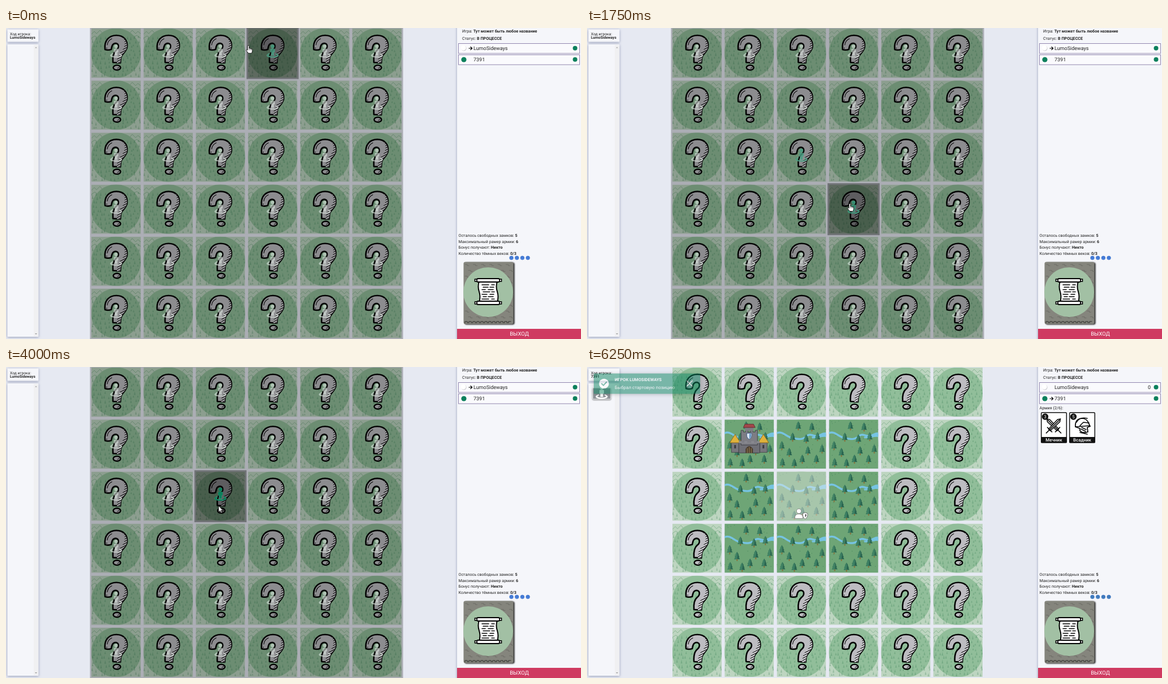
Animation, 1016 px wide and 551 px high, one loop 6500 ms. Source, as an HTML page:

```html
<!DOCTYPE html>
<html lang="ru">
<head>
<meta charset="utf-8">
<style>
html, body { margin: 0; width: 100%; height: 100%; overflow: hidden; background: #e6e9f2; }
svg { display: block; width: 1016px; height: 551px; font-family: Roboto, sans-serif; fill: #222; text-rendering: geometricPrecision; }
.panel { fill: #f5f6fa; filter: drop-shadow(0 1px 2px #5a648c99); }
.line { fill: none; stroke: #000; stroke-linecap: round; stroke-linejoin: round; }
b, .b { font-weight: 700; }
</style>
</head>
<body>
<svg id="stage" viewBox="0 0 1016 551"></svg>
<script>
const LOOP = 6500, REVEAL = 4250, SETTLED = 4500, TOAST_FADE = 6250;
const PITCH = 92.2, SIZE = 87;
const PLAYER = 'LumoSideways', RIVAL = '7391';
const GREEN = '#0c805c';

// time, hovered column, row, pawn tint
const hovers = [
  [0, 3, 0, .6], [250, 2, 0, .6], [500, 2, 0, 1], [750, 1, 1, .6], [1000, 1, 1, 1],
  [1250, 2, 2, .6], [1500, 2, 2, 1], [1750, 3, 3, .7], [2000, 4, 3, .6], [2250, 4, 3, 1],
  [2500, 3, 2, .15], [2750, 2, 2, .6], [3000, 2, 2, 1]
];
// time, x, y, shape
const pointer = [
  [0, 424, 31, 'hand'], [250, 392, 79, 'hand'], [500, 330, 91, 'hand'], [750, 300, 143, 'hand'],
  [1000, 322.5, 174, 'hand'], [1250, 366, 235, 'hand'], [1500, 405, 275, 'hand'],
  [1750, 460, 311, 'hand'], [2000, 545, 325, 'hand'], [2250, 566, 336, 'hand'],
  [2500, 446.5, 263, 'hand'], [2750, 388, 256, 'hand'], [3000, 375, 248, 'hand'],
  [3250, 374, 247, 'hand'], [4000, 375.5, 246, 'arrow'], [5000, 430, 140, 'arrow'],
  [5250, 469.5, 53, 'arrow'], [5500, 499, 5.5, 'arrow'], [5750, 0, 0, '']
];

let seed = 7;
const rnd = () => (seed = seed * 16807 % 2147483647) / 2147483647;
const range = (n, f) => Array.from({ length: n }, (_, i) => f(i)).join('');
const rect = (x, y, w, h, fill, more = '') => `<rect x="${x}" y="${y}" width="${w}" height="${h}" fill="${fill}" ${more}/>`;
const disc = (x, y, r, fill, more = '') => `<circle cx="${x}" cy="${y}" r="${r}" fill="${fill}" ${more}/>`;
const path = (d, fill, more = '') => `<path d="${d}" fill="${fill}" ${more}/>`;
const line = (d, w = 1, color = '#000') => `<path class="line" d="${d}" style="stroke:${color};stroke-width:${w}"/>`;
const text = (x, y, size, s, more = '') => `<text x="${x}" y="${y}" font-size="${size}" ${more}>${s}</text>`;
const bold = s => `<tspan class="b">${s}</tspan>`;
const use = (id, x, y, more = '') => `<use href="#${id}" transform="translate(${x} ${y})" ${more}/>`;
const group = (id, s, more = '') => `<g id="${id}" ${more}>${s}</g>`;
const cellX = c => 151 + PITCH * c, cellY = r => 1 + PITCH * r;

const paleTrees = range(120, i => {
  const x = (i % 12) * 7.4 + rnd() * 5, y = 14 + (i / 12 | 0) * 7.4 + rnd() * 4;
  const h = 2 + rnd() * 2.2;
  return path(`M${x} ${y - h}l1.5 ${h * 1.7}h-3z`, '#3d8058', 'opacity=".3"');
});
const hills = line('M0 10l5-5 4 4 6-6 5 6 5-3 5 5M56 9l6-4 5 4 5-6 6 6 4-4 6 5M0 17l6-4 5 4M74 16l6-4 7 5', .8, '#7fae8c');
const mark = 'M24 37C22 20 32 12 44 12C57 12 64 21 63 32C62 42 53 45 52 52L51 61L38 60C37 48 39 42 44 38C49 34 49 27 43 26C37 26 36 31 35 37Q29 39 24 37Z';
const side = 'M56 16C66 26 64 37 57 43C53 47 52 52 51 61L45 61C45 50 47 46 53 40C60 33 60 24 56 16Z';
const question =
  path(mark, '#bdbcc1', 'stroke="#000" stroke-width="2.6" stroke-linejoin="round"') +
  path(side, '#d2d1d6') +
  `<g clip-path="url(#sideClip)">${range(12, i => line(`M42 ${24 + i * 4}L67 ${11 + i * 4}`, 1.1))}</g>` +
  line('M28 29Q29 21 36 18M27 34v1', 1.1) +
  `<ellipse cx="45" cy="69.2" rx="6.5" ry="4.3" fill="#bdbcc1" stroke="#000" stroke-width="2.4"/>` +
  line('M46 70.5l3-2', 1);

const tree = path('M0 -8L3 -3H2L4.3 1H3L5 5H-5L-3 1H-4.3L-2 -3H-3Z', '#28634f') +
  path('M0 -8L1 -3 0 5H-5L-3 1H-4.3L-2 -3H-3Z', '#3d8063') + rect(-.9, 5, 1.8, 3, '#8a6a32');
const treeSpots = [[38, 11], [62, 13], [72, 30], [28, 31], [52, 34], [9, 46], [55, 55], [22, 58], [80, 52], [70, 70], [45, 70], [10, 76], [31, 77]];
const land = rect(0, 0, SIZE, SIZE, '#6ea576') +
  range(40, () => disc(rnd() * 87, rnd() * 87, .7, '#4f8c60')) +
  line('M0 24C10 19 17 31 28 33S45 36 53 29S67 35 87 27', 3.4, '#76c3e2') +
  path('M62 30C72 31 78 22 87 23V31C78 29 72 34 62 33Z', '#76c3e2') +
  treeSpots.map(([x, y], i) => use('tree', x, y, i % 3 == 2 ? 'opacity=".9"' : '')).join('');

const tower = x => rect(x, 40, 13, 18, '#77777d', 'stroke="#3c3c42" stroke-width=".8"') +
  path(`M${x - 3} 41L${x + 6.5} 26L${x + 16} 41Z`, '#e0b23b', 'stroke="#7b5b18" stroke-width=".8"') +
  rect(x + 5, 45, 3, 6, '#38383d');
const castle = tower(12) + tower(62) +
  rect(25, 42, 37, 17, '#6f6f76', 'stroke="#3c3c42" stroke-width=".8"') +
  path('M29 45V19H33V22H37V19H41V22H46V19H50V22H54V19H58V45Z', '#7d7d84', 'stroke="#3c3c42" stroke-width=".9"') +
  rect(36, 13, 15, 7, '#7d7d84') + path('M33 14L36 8H51L54 14Z', '#a2474a', 'stroke="#5c2529" stroke-width=".8"') +
  path('M25 42v-4h5v3h5v-3h5v3h7v-3h5v3h5v-3h5v4z', '#88888f') +
  path('M37 59V52Q43.5 42 50 52V59Z', '#4a3c2e') + line('M40 59v-8M43.5 59v-10M47 59v-8', 1, '#a58b5c') +
  path('M39 24h9v5q-1 5-4.500 6q-3.500-1-4.500-6z', '#dce7f2', 'stroke="#3d587c"') + path('M43.500 25h3.500v4q-1 4-3.500 5z', '#6a9ac9');

const pawn = disc(43.5, 31.5, 3.2, 'inherit') +
  path('M39.5 36Q43.500 34.500 47.500 36V42H46V48H41V42H39.500Z', 'inherit') +
  path('M38.500 43.500C29 46 32 51.500 43.500 51.500S58 46 48.500 43.500V45.500C54 47 50 49 43.500 49S33 47 38.500 45.500Z', 'inherit');

const hand = path('M3 1.500Q3 0 4.300 0T5.600 1.500V5Q7 4.300 7.600 5.400Q9 4.800 9.500 6Q11 5.500 11.200 7V10Q11 12 9.700 13.800H4.500L.5 9Q0 7.400 1.600 7.300L3 8.500Z', '#fff', 'stroke="#111" stroke-width=".9"') +
  line('M5.600 5v3M7.600 5.500v2.500M9.500 6v2', .5);
const arrow = path('M0 0V11L2.600 8.600L4.500 12.600L6.300 11.800L4.500 7.900H8Z', '#fff', 'stroke="#111" stroke-width=".9"');

const defs = `<defs><clipPath id="sideClip"><path d="${side}"/></clipPath>
  <clipPath id="tileClip"><rect width="87" height="87"/></clipPath>` +
  group('tree', tree) + group('pawn', pawn) + group('land', land, 'clip-path="url(#tileClip)"') +
  group('fog', rect(0, 0, SIZE, SIZE, '#bdd5c0') + hills + disc(43.5, 43.5, 44, '#91be9a') + paleTrees + question, 'clip-path="url(#tileClip)"') + '</defs>';

const cells = f => range(36, i => f(i % 6, i / 6 | 0));
const isLand = (c, r) => c > 0 && c < 4 && r > 0 && r < 4;
const fog = cells((c, r) => use('fog', cellX(c), cellY(r)));
const unit = disc(39, 70, 4.200, '#fff', 'stroke="#777" stroke-width=".8"') +
  path('M32 83V80Q33 75 39 75Q45 75 46 80V83Z', '#fff', 'stroke="#777" stroke-width=".8"') +
  path('M46 74L50 72.500L54.500 74Q55 81 50 84Q45 81 46 74Z', '#fff', 'stroke="#666" stroke-width=".9"') + path('M50 75l2.500 1q0 3-2.500 5z', '#555');
const lands = cells((c, r) => isLand(c, r)
  ? `<g transform="translate(${cellX(c)} ${cellY(r)})"><g class="flip">` + use('land', 0, 0) +
    (c == 1 && r == 1 ? castle : '') +
    (c == 2 && r == 2 ? rect(0, 0, SIZE, SIZE, '#e9ece9', 'opacity=".46"') + unit : '') + '</g></g>'
  : '');
const shade = cells((c, r) => `<g class="cell" transform="translate(${cellX(c)} ${cellY(r)})">` +
  rect(-2.6, -2.6, PITCH, PITCH, '#000', 'opacity=".26"') +
  use('pawn', 0, 0, 'fill="#e9f2ec" opacity=".55"') + use('pawn', 0, 0, `fill="${GREEN}" opacity="0"`) + '</g>');

const left = rect(2.5, 2.5, 55, 22, '', 'class="panel" rx="1"') +
  text(7, 12.5, 6.8, 'Ход игрока:') +
  text(7, 19.3, 6.6, PLAYER, 'class="b before"') + text(7, 19.3, 6.6, RIVAL, 'class="b after"') +
  rect(2.5, 29, 55, 518, '', 'class="panel" rx="1"') + rect(49, 30, 8, 516, '#f0f0f2') +
  path('M51 35.500l2-2 2 2z', '#aaa') + path('M51 541l2 2 2-2z', '#999') +
  group('log', rect(10, 37, 32, 20, '#8f9499', 'rx="1.500" stroke="#fff" stroke-width="1" style="filter:drop-shadow(0 1px 1px #0008)"') +
    use('pawn', -17.500, 5, 'fill="#fff"'), 'class="after"');

const playerRow = (y, name) => rect(799.5, y + .5, 214, 17.500, '#fafafd', 'stroke="#9085ae"') +
  text(826, y + 12, 9, name) + disc(1005.5, y + 8.8, 4, GREEN);
const turnArrow = y => line(`M818 ${y}h5.500M821 ${y - 2.500}l2.600 2.500l-2.600 2.500`, 1.2);
const swords = range(2, i => `<g transform="translate(824.500 104) scale(${i ? -1 : 1} 1)">` +
  path('M-12-12L-7-11L9 6L6 9L-11-7Z', '#fff', 'stroke="#000" stroke-width="1.500"') +
  line('M-10-10L6 6M3 11L11 3M8 8L13 13', 1.7) + '</g>');
const helmet = path('M863 106Q862 92 874 91Q884 91 887 101L889 105L884 107L885 115Q876 118 871 113V109Z', '#fff', 'stroke="#000" stroke-width="1.700"') +
  line('M863 106L888 104M871 104L877 98L887 99M874 107l8 4M873 110l8 4M865 98Q870 88 884 91M871 116l13 3', 1.5);
const armyCard = (x, n, name, icon) => rect(x + .7, 80.7, 44.600, 53, '#fff', 'stroke="#111" stroke-width="1.500" rx="1.500"') + icon +
  rect(x, 124, 46, 10.500, '#111', 'rx="1"') + text(x + 23, 132, 8, name, 'fill="#fff" text-anchor="middle" font-weight="500"') +
  disc(x + 7.500, 88, 5.700, '#111') + text(x + 7.500, 90.900, 8, n, 'fill="#fff" text-anchor="middle"');
const army = text(799.5, 75.3, 7.2, 'Армия (2/6):') + armyCard(802, 3, 'Мечник', swords) + armyCard(852, 5, 'Всадник', helmet);
const stats = [['Осталось свободных замков', 5], ['Максимальный рамер армии', 6], ['Бонус получают', 'Никто'], ['Количество тёмных веков', '0/3']]
  .map(([k, v], i) => text(799.5, 370.300 + i * 10.400, 7.1, `${k}: ${bold(v)}`)).join('');

const stones = range(60, i => {
  const x = 811 + (i % 6) * 14.500 + (i / 6 & 1) * 6, y = 419 + (i / 6 | 0) * 10.300;
  return line(`M${x} ${y}h4v2h3`, 1, '#6d6d66');
});
const scroll = path('M836 449H868Q865 458 868 467T868 486H836Q839 476 836 467T836 449Z', '#fff', 'stroke="#000" stroke-width="2"') +
  range(2, i => rect(832, 444 + i * 40, 40, 6, '#fff', 'rx="2" stroke="#000" stroke-width="2"') +
    rect(828.500, 445 + i * 40, 3.500, 4, '#fff', 'stroke="#000" stroke-width="1.600"') + rect(872, 445 + i * 40, 3.500, 4, '#fff', 'stroke="#000" stroke-width="1.600"')) +
  range(7, i => line(`M${841 + i % 2 * 2} ${455 + i * 4.200}h${12 - i % 3 * 3}M${858 - i % 3 * 3} ${455 + i * 4.200}h${5 + i % 3 * 2}`, 1.500));
const deck = rect(808.5, 414.500, 88, 110, '#85857d', 'rx="3" style="filter:drop-shadow(2px 1px 1px #222)"') + stones +
  disc(852, 468, 44, '#a2c0a4') + scroll +
  line('M811 523v-3h4' + range(11, () => 'v2h3v-2h4'), 1.1, '#33332f');
const gems = range(4, i => disc(893 + i * 9.700, 407.300, 3.300, '#4f87e6', 'class="gem" stroke="#2860ba" stroke-width=".6"') +
  line(`M${891 + i * 9.700} 406l3 3M${893 + i * 9.700} 405l2 2`, .7, '#24539f'));

const right = rect(797, -4, 224, 560, '', 'class="panel"') +
  text(806, 8, 7.2, `Игра: ${bold('Тут может быть любое название')}`) +
  text(806, 21, 7.2, `Статус: ${bold('В ПРОЦЕССЕ')}`) +
  playerRow(27, PLAYER) + playerRow(47, RIVAL) +
  disc(809, 36, 4.500, '#c3c3c8') + disc(808.300, 35.200, 4.500, '#fff') + disc(809, 56, 4.600, GREEN) +
  group('', turnArrow(36), 'class="before"') +
  group('', turnArrow(56) + text(991, 39, 9, '0') + army, 'class="after"') +
  stats + deck + gems +
  rect(797, 533, 219, 18, '#cf3b61') + text(907, 545.400, 9.500, 'ВЫХОД', 'fill="#fff" text-anchor="middle"');

const toast = group('toast', rect(12, 11.500, 188, 36, '#0c8460', 'rx="1" style="filter:drop-shadow(0 1px 3px #0006)"') +
  disc(30, 29.500, 8.700, '#fff') + line('M26 29.700l3 3l5.500-6', 1.900, '#0c8460') +
  text(49, 24.800, 7.500, `ИГРОК ${PLAYER.toUpperCase()}`, 'fill="#fff" class="b"') +
  text(49, 39.300, 8, 'Выбрал стартовую позицию', 'fill="#fff"') +
  line('M176.500 24.500l9.500 9.500M186 24.500l-9.500 9.500', 1.700, '#fff'), 'class="after"');

const stage = document.getElementById('stage');
stage.innerHTML = defs + fog + group('', shade, 'class="before"') + group('', lands, 'class="after"') +
  left + right + toast + group('hand', hand) + group('arrow', arrow);

const all = s => [...stage.querySelectorAll(s)];
const before = all('.before'), after = all('.after'), flips = all('.flip'), gemDots = all('.gem'), shades = all('.cell');
const byId = id => document.getElementById(id);
const show = (el, on) => { el.style.display = on ? '' : 'none'; };
const stepAt = (table, t) => table.findLastIndex(s => s[0] <= t);

function draw(t) {
  const revealed = t >= REVEAL;
  before.forEach(el => show(el, !revealed));
  after.forEach(el => show(el, revealed));

  const h = stepAt(hovers, t), now = hovers[h], prev = hovers[h - 1];
  shades.forEach((el, i) => {
    const isAt = s => s && s[1] + s[2] * 6 == i;
    const [cover, , tint] = el.children;
    cover.setAttribute('opacity', isAt(now) ? .5 : .26);
    tint.setAttribute('opacity', isAt(now) ? now[3] : isAt(prev) ? .6 : 0);
  });

  flips.forEach(el => el.setAttribute('transform', t < SETTLED ? 'translate(1.200 .3) skewY(-.7)' : ''));
  gemDots.forEach(el => el.setAttribute('fill', revealed ? '#4a87c4' : '#4f87e6'));
  byId('log').style.opacity = t < SETTLED ? .7 : 1;
  byId('toast').style.opacity = t < TOAST_FADE ? 1 : .5;

  const [, x, y, shape] = pointer[stepAt(pointer, t)];
  for (const id of ['hand', 'arrow']) {
    show(byId(id), id == shape);
    byId(id).setAttribute('transform', `translate(${x} ${y})`);
  }
}

const start = performance.now();
function tick() {
  draw((performance.now() - start) % LOOP);
  requestAnimationFrame(tick);
}
tick();
</script>
</body>
</html>
```
